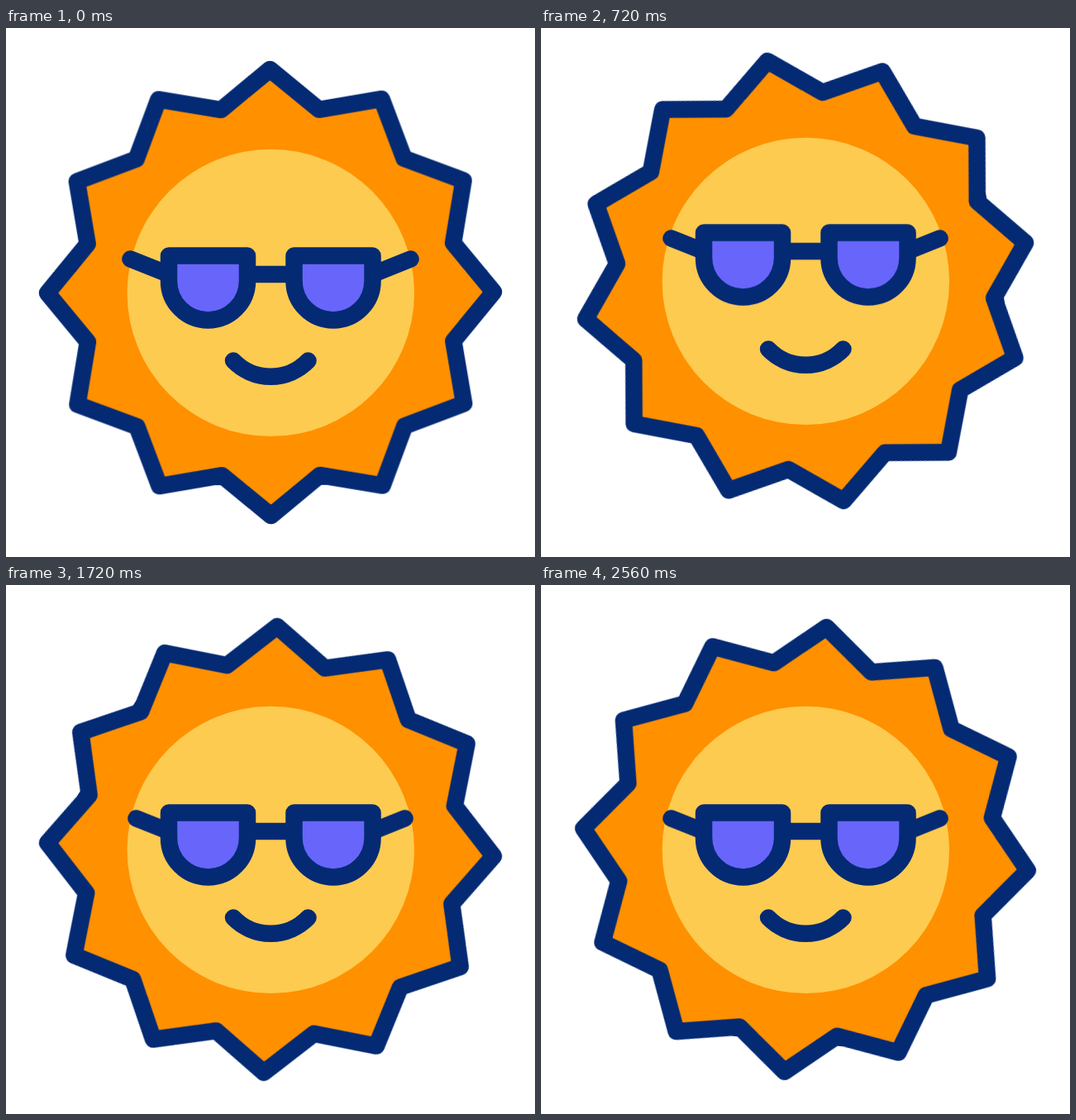
Write an HTML page that moves like this. It is 640x640 px and loops after 2.6 s.

```html
<!DOCTYPE html>
<html lang="en">
<head>
<meta charset="utf-8">
<title>Cool sun</title>
<style>
  html, body { margin: 0; width: 100%; height: 100%; overflow: hidden; background: #fff; }
  svg { display: block; width: 100%; height: 100%; }

  .line { fill: none; stroke: #042a74; stroke-width: 20.5; stroke-linecap: round; stroke-linejoin: round; }
  #rays { fill: #ff9000; transform-origin: 320px 320px; animation: spin 2600ms linear infinite; }
  .lens { fill: #6865fa; }

  /* Both bounces share one rhythm; the shades add their own on top of the body's. */
  .bounce { animation: bounce 2600ms cubic-bezier(.37, 0, .63, 1) infinite; }
  .body { --a: 20px; --b: -17.3px; --c: 10.2px; --d: -9.7px; }
  .shades { --a: 20.5px; --b: -17.6px; --c: 13.9px; --d: -10.1px; }
  .arm { animation: tuck 2600ms cubic-bezier(.37, 0, .63, 1) infinite; }
  .left { --x: 7px; }
  .right { --x: -7px; }

  @keyframes spin { to { transform: rotate(-360deg); } }
  @keyframes bounce {
    0% { transform: translateY(0); }
    13.846% { transform: translateY(var(--a)); }
    24.615% { transform: translateY(var(--b)); }
    38.462% { transform: translateY(var(--c)); }
    52.308% { transform: translateY(var(--d)); }
    66.154%, 100% { transform: translateY(0); }
  }
  @keyframes tuck {
    0%, 10.769% { transform: translate(0, 0); }
    24.615%, 100% { transform: translate(var(--x), 2.8px); }
  }
</style>
</head>
<body>
<svg viewBox="0 0 640 640">
  <g class="bounce body">
    <polygon id="rays" class="line"/>
    <circle cx="320.3" cy="320.4" r="173.7" fill="#fdcb50"/>
    <path class="line" d="M275 402.5A62.9 62.9 0 0 0 365.5 402.5"/>
    <g class="bounce shades">
      <path class="line arm left" d="M150.5 279.5L197 298"/>
      <path class="line arm right" d="M489.5 279.5L443.5 298"/>
      <path class="line" d="M292 298H348.5"/>
      <path class="line lens" d="M197 275.5H292V306A47.5 47.5 0 0 1 197 306Z"/>
      <path class="line lens" d="M348.5 275.5H443.5V306A47.5 47.5 0 0 1 348.5 306Z"/>
    </g>
  </g>
</svg>
<script>
  const points = Array.from({ length: 24 }, (_, i) => {
    const angle = i * Math.PI / 12;
    const radius = i % 2 ? 229 : 270;
    return [320 + radius * Math.sin(angle), 320 - radius * Math.cos(angle)];
  });
  document.getElementById('rays').setAttribute('points', points.join(' '));
</script>
</body>
</html>
```
